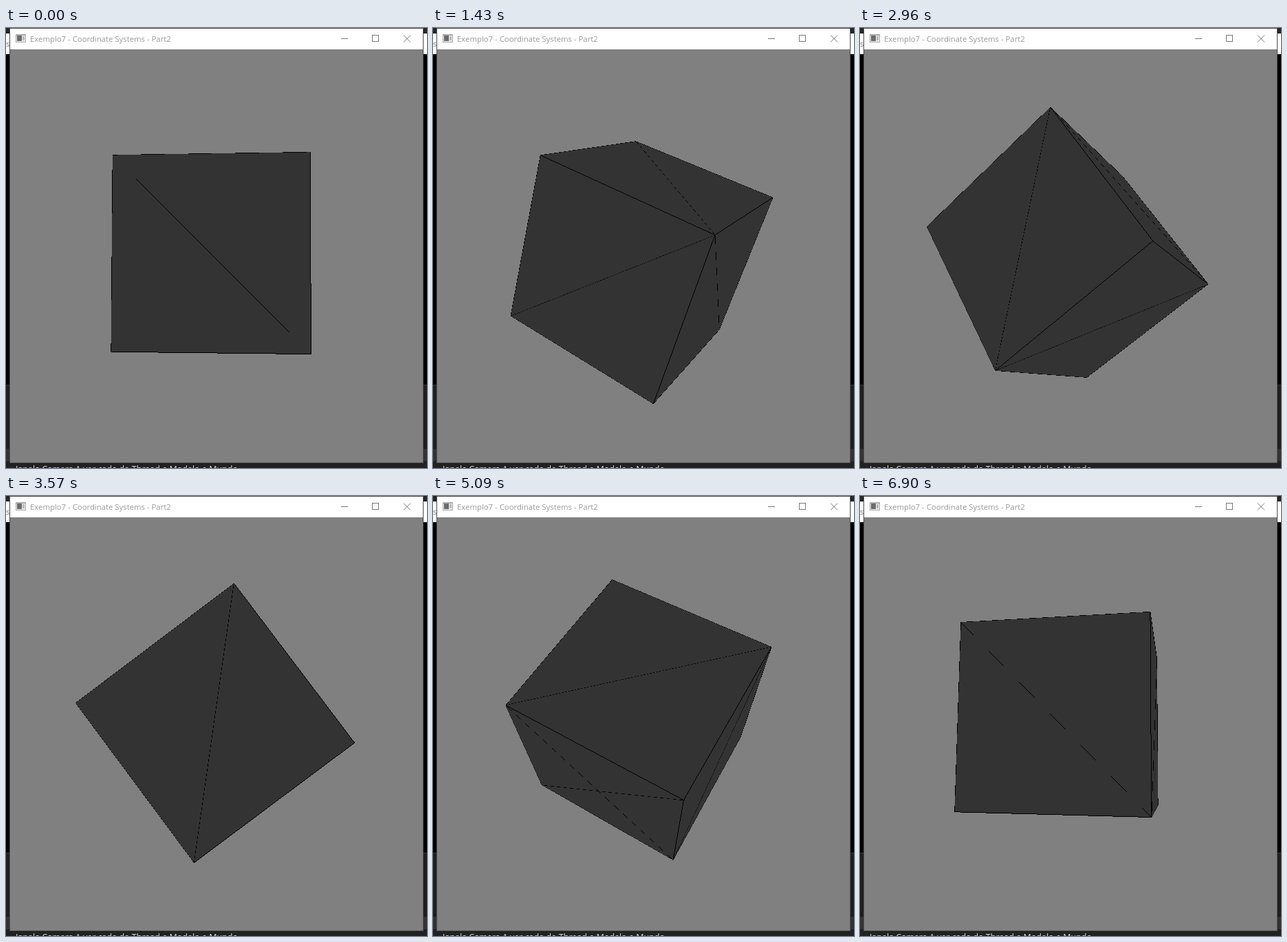
An HTML page with a canvas for the animation above (6950 ms loop, 612 by 639 pixels).

```html
<!DOCTYPE html>
<html lang="pt">
<head>
<meta charset="utf-8">
<title>Coordinate Systems</title>
<style>
  html, body { margin: 0; width: 100%; height: 100%; overflow: hidden; background: #000; }
  svg, canvas { position: absolute; display: block; }
  svg { left: 0; top: 0; }
  canvas { left: 6px; top: 31px; }
  text { font-family: "Open Sans", "Noto Sans", sans-serif; white-space: pre; }
</style>
</head>
<body>
<svg width="612" height="639" viewBox="0 0 612 639" shape-rendering="crispEdges">
  <!-- desktop behind the window -->
  <rect width="612" height="639" fill="#000"/>
  <rect width="612" height="8" fill="#262626"/>
  <rect y="8" width="612" height="30" fill="#fff"/>
  <text x="0" y="27" font-size="11" fill="#777">s</text>
  <rect y="518" width="612" height="93" fill="#1f1f20"/>
  <rect y="518" width="612" height="1" fill="#3a3a3a"/>
  <rect y="611" width="612" height="18" fill="#333"/>
  <rect y="629" width="612" height="10" fill="#222"/>
  <text x="14" y="645" font-size="12.5" fill="#ddd">Janela Camera A ver cada do Thread e Modelo e Mundo</text>
  <!-- window -->
  <rect x="5" y="0" width="602" height="632" fill="#4a4a4a"/>
  <rect x="6" y="1" width="600" height="30" fill="#fff"/>
  <rect x="14" y="9" width="15" height="12" fill="#a9a9a9"/>
  <rect x="15" y="11" width="13" height="9" fill="#ececec"/>
  <rect x="16" y="11" width="7" height="8" fill="#6c6c6c"/>
  <rect x="24" y="12" width="3" height="6" fill="#bbb"/>
  <text x="35" y="20" font-size="11.35" fill="#999">Exemplo7 - Coordinate Systems - Part2</text>
  <g fill="none" stroke="#777">
    <path d="M487 15.5h10M532.5 10.5h9v9h-9z"/>
    <path d="M578 10.5l10 10m0-10l-10 10" shape-rendering="auto"/>
  </g>
</svg>
<canvas id="view" width="600" height="600"></canvas>
<script>
const SIZE = 600, MID = SIZE / 2, DIST = 3;
const FOCAL = MID / Math.tan(Math.PI / 8);
const FIRST = -4.2, PER_REFRESH = 50 / 59.94, COUNT = 151;
const BACK = 0xff808080, FACE = 0xff333333, LINE = 0xff000000;

// Each pose lasts two or three screen refreshes, shown as 30 or 50 ms.
const ODD_HOLDS = { 0: 30, 8: 40, 94: 40 };
function isShort(n) {
  const m = n < 95 ? n : n + 1;
  return [5, 10, 15].includes(m % 16) || n === 2 || n === 94;
}
const poses = [];
let loop = 0, angle = FIRST;
for (let n = 0; n < COUNT; n++) {
  const short = isShort(n);
  loop += ODD_HOLDS[n] || (short ? 30 : 50);
  poses.push({ angle, end: loop });
  angle += (short ? 2 : 3) * PER_REFRESH;
}

// Corner bits: 1 = +x, 2 = +y, 4 = +z.
const lines = [];
for (let a = 0; a < 8; a++)
  for (const bit of [1, 2, 4]) if (!(a & bit)) lines.push([a, a | bit]);
const tetra = [0, 3, 5, 6];
tetra.forEach((a, i) => tetra.slice(i + 1).forEach(b => lines.push([a, b])));
lines.push([1, 4]);

const ctx = document.getElementById("view").getContext("2d");
const image = ctx.createImageData(SIZE, SIZE);
const pixels = new Uint32Array(image.data.buffer);

// Rotation about (0.5, 1, 0), as rows.
function rotation(deg) {
  const th = deg * Math.PI / 180, c = Math.cos(th), s = Math.sin(th);
  const ax = 1 / Math.sqrt(5), ay = 2 * ax, k = 1 - c;
  return [
    [c + ax * ax * k, ax * ay * k, ay * s],
    [ax * ay * k, c + ay * ay * k, -ax * s],
    [-ay * s, ax * s, c]
  ];
}

// Each cube side gives an inverse depth that is linear over the screen.
function sides(r) {
  const front = [], rear = [];
  for (let i = 0; i < 3; i++) for (const sign of [-1, 1]) {
    const [nx, ny, nz] = r.map(row => row[i] * sign);
    const d = 0.5 - DIST * nz;
    const gx = nx / d / FOCAL, gy = -ny / d / FOCAL;
    (d < 0 ? front : rear).push([gx, gy, -nz / d - MID * (gx + gy)]);
  }
  return { front, rear };
}

// Inverse depth of the cube at a pixel, or -1 where the ray misses it.
function cubeAt(x, y, { front, rear }) {
  let near = Infinity, far = -Infinity;
  for (const p of front) near = Math.min(near, p[0] * x + p[1] * y + p[2]);
  for (const p of rear) far = Math.max(far, p[0] * x + p[1] * y + p[2]);
  return near > far ? near : -1;
}

function project(corner, r) {
  const v = [1, 2, 4].map(bit => corner & bit ? 0.5 : -0.5);
  const [x, y, z] = r.map(row => row[0] * v[0] + row[1] * v[1] + row[2] * v[2]);
  const q = 1 / (DIST - z);
  return [MID + FOCAL * x * q, MID - FOCAL * y * q, q];
}

// One pixel per step; depth is compared at the pixel centre, which breaks up coplanar lines.
function drawLine(a, b, cube) {
  const major = Math.abs(b[0] - a[0]) >= Math.abs(b[1] - a[1]) ? 0 : 1;
  const minor = 1 - major;
  if (a[major] > b[major]) [a, b] = [b, a];
  const span = b[major] - a[major];
  for (let m = Math.ceil(a[major] - 0.5); m + 0.5 < b[major]; m++) {
    const t = (m + 0.5 - a[major]) / span;
    const n = Math.floor(a[minor] + t * (b[minor] - a[minor]));
    const [x, y] = major ? [n, m] : [m, n];
    const q = a[2] + t * (b[2] - a[2]);
    if (q >= cubeAt(x + 0.5, y + 0.5, cube) - 1e-7) pixels[y * SIZE + x] = LINE;
  }
}

function draw(deg) {
  const r = rotation(deg), cube = sides(r);
  const pts = Array.from({ length: 8 }, (_, i) => project(i, r));
  const xs = pts.map(p => p[0]), ys = pts.map(p => p[1]);
  const x0 = Math.floor(Math.min(...xs)), x1 = Math.ceil(Math.max(...xs));
  const y0 = Math.floor(Math.min(...ys)), y1 = Math.ceil(Math.max(...ys));
  pixels.fill(BACK);
  for (let y = y0; y < y1; y++)
    for (let x = x0; x < x1; x++)
      if (cubeAt(x + 0.5, y + 0.5, cube) > 0) pixels[y * SIZE + x] = FACE;
  for (const [a, b] of lines) drawLine(pts[a], pts[b], cube);
  ctx.putImageData(image, 0, 0);
}

let shown = null;
const start = performance.now();
function tick() {
  const t = (performance.now() - start) % loop;
  const pose = poses.find(p => t < p.end);
  if (pose !== shown) draw((shown = pose).angle);
  requestAnimationFrame(tick);
}
tick();
</script>
</body>
</html>
```
